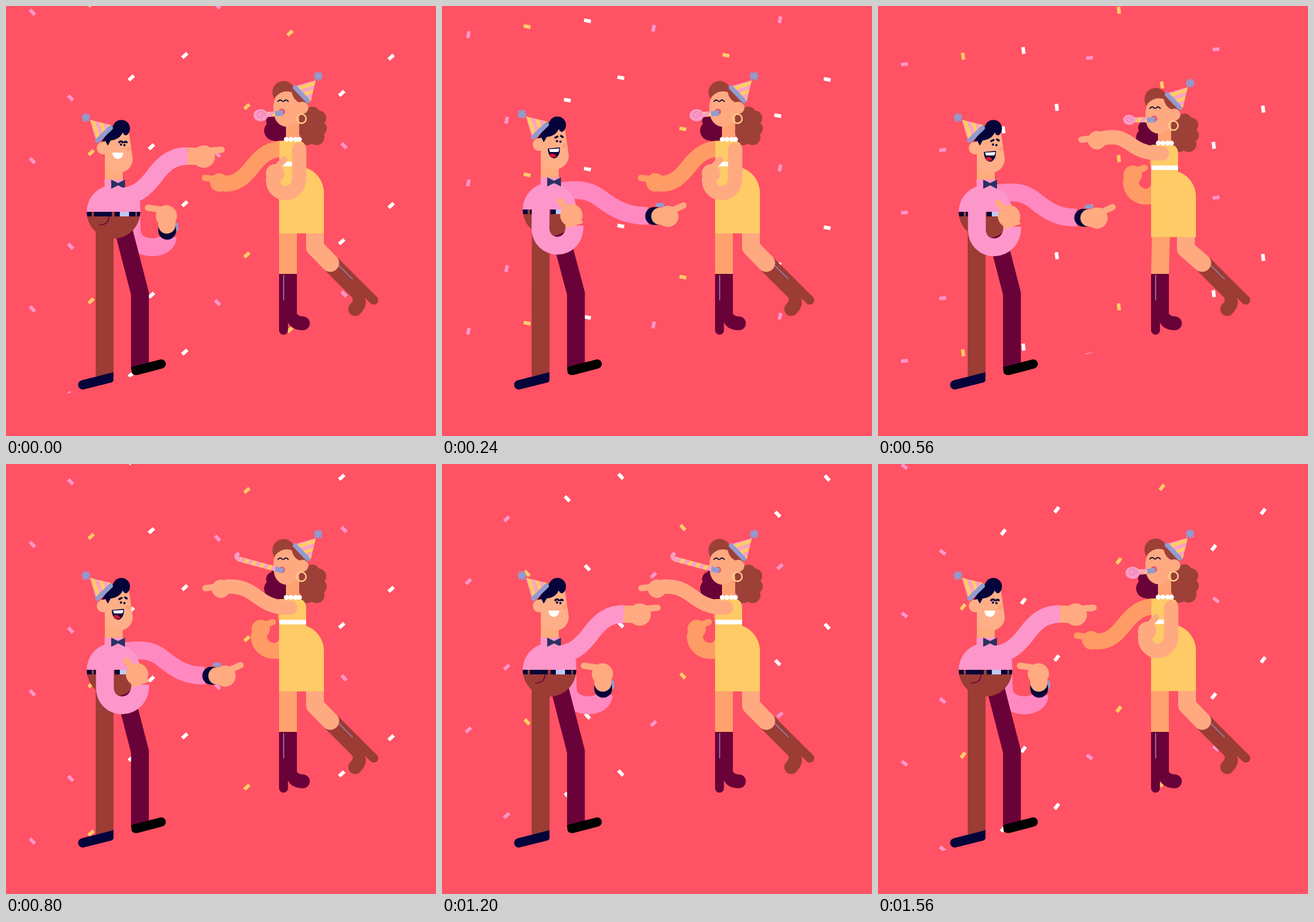
Write an HTML page that moves like this. It is 748 px wide and 748 px high and loops after 1600 ms.

```html
<!DOCTYPE html>
<html lang="en">
<head>
<meta charset="utf-8">
<title>Party</title>
<style>
  html, body { margin: 0; width: 100%; height: 100%; overflow: hidden; background: #ff5264; }
  svg { display: block; width: 100vw; height: 100vh; }
  .line { fill: none; }
  .pom { stroke: #929bd0; stroke-width: 3.4; stroke-linecap: round; }
</style>
</head>
<body>
<svg viewBox="0 0 748 748">
  <defs>
    <clipPath id="floor"><path d="M0 0H748V503L0 703Z"/></clipPath>
    <clipPath id="belly"><circle cx="187" cy="358" r="46.5"/></clipPath>
    <linearGradient id="stripes" gradientUnits="userSpaceOnUse" x1="0" y1="0" x2="12" y2="-4" spreadMethod="repeat">
      <stop offset=".5" stop-color="#fca2c4"/><stop offset=".5" stop-color="#ffcc66"/>
    </linearGradient>
    <linearGradient id="bands" gradientUnits="userSpaceOnUse" x1="0" y1="0" x2="10" y2="8" spreadMethod="repeat">
      <stop offset=".5" stop-color="#fb9cc8"/><stop offset=".5" stop-color="#fecb66"/>
    </linearGradient>
    <g id="hat">
      <path d="M7 4L17 38L44 13Z" fill="url(#stripes)"/>
      <path d="M20 40L43 18" stroke="#929bd0" stroke-width="8" stroke-linecap="round"/>
      <path class="pom" d="M-6.500 0H6.500M0-6.500V6.500M-4.800-4.800L4.800 4.800M-4.800 4.800L4.800-4.800"/>
    </g>
    <g id="boot">
      <path d="M-15.5 0H15.5V69Q18 74 26 74A12 12 0 0 1 26 98C12 98 3 92 0 84V98A7.7 7.7 0 0 1-15.5 98Z"/>
      <path d="M-7.5 2V46" stroke="#8f86bd" stroke-width="1.6"/>
    </g>
  </defs>
  <rect width="748" height="748" fill="#ff5264"/>
  <g id="confetti" clip-path="url(#floor)"></g>

  <g id="man">
    <g id="manFar"></g>
    <path id="legFar" class="line" stroke="#690238" stroke-width="31"/>
    <path id="legNear" class="line" stroke="#9b3c35" stroke-width="31"/>
    <path d="M218 628L268 615A8 8 0 0 1 272 630.5L228 642Q218 643 218 634Z"/>
    <path d="M187 637L132 651A8 8 0 0 0 135 667L183 655Q187 654 187 650Z" fill="#04043a"/>
    <g id="manBody">
      <path d="M172 265H203V306H172Z" fill="#ffac7c"/>
      <g clip-path="url(#belly)">
        <path d="M140 310H235V359H140Z" fill="#fd96cb"/>
        <path d="M140 358H235V406H140Z" fill="#9b3c35"/>
        <path d="M140 358H235V366H140Z" fill="#05053a"/>
        <path d="M149 358H153V366H149ZM184 358H189V366H184ZM225 358H228V366H225Z" fill="#9b3c35"/>
        <path d="M198 358H214V366H198Z" fill="#c1c8f3"/>
        <path class="line" d="M179 366Q179 381 162 381" stroke="#690238" stroke-width="1.6"/>
      </g>
      <path d="M171.5 302H206V320H171.5Z" fill="#fd96cb"/>
      <path d="M183 302L195 308L207 302V318L195 312L183 318Z" fill="#2a3163"/>
    </g>
    <g id="manHead">
      <path d="M172 230L190 217L214 221L220 262A23.5 23.5 0 0 1 196 290Q180 290 172 277Z" fill="#ffaf87"/>
      <circle cx="169" cy="247" r="11" fill="#ffaf87"/>
      <circle cx="213" cy="249" r="4" fill="#ffa176"/>
      <path d="M166 236L187 207A15 15 0 1 1 212 223Q207 228 203 220Q198 232 182 234L177 243L173 235Z" fill="#04043a"/>
      <use href="#hat" x="139" y="194"/>
      <g id="smile">
        <path d="M185 255H204A9.5 11 0 0 1 185 255Z" fill="#fff"/>
        <path class="line" d="M197 237Q200 234 203 237M206 237Q208 235 210 237" stroke="#04043a" stroke-width="3.5" stroke-linecap="round"/>
      </g>
      <g id="laugh">
        <path d="M184 254L205 252A10.5 16 0 0 1 195 271Q185 270 184 254Z" fill="#04043a"/>
        <path d="M186 255L204 254Q204 258 202 260L188 260Z" fill="#fff"/>
        <path d="M187 264Q196 260 199 268Q190 273 187 264Z" fill="#d9132f"/>
        <path class="line" d="M197 235L201 233M207 232L210 234" stroke="#04043a" stroke-width="3.5" stroke-linecap="round"/>
      </g>
      <path d="M200 241h.01M206 242h.01" stroke="#04043a" stroke-width="4" stroke-linecap="round"/>
    </g>
    <g id="manNear"></g>
  </g>

  <g id="woman">
    <g id="hair">
      <g fill="#690238">
        <path d="M462 185H488V235H466Z"/>
        <circle cx="466" cy="217" r="17"/><circle cx="465" cy="200" r="12.5"/>
      </g>
      <g fill="#9d4038">
        <circle cx="529" cy="207" r="25"/><circle cx="533" cy="188" r="13"/>
        <circle cx="544" cy="195" r="13"/><circle cx="546" cy="213" r="12"/>
        <circle cx="540" cy="228" r="14"/><circle cx="524" cy="230" r="12"/>
      </g>
    </g>
    <g id="womanFar"></g>
    <path id="legBack" class="line" stroke="#ffa26d" stroke-width="31"/>
    <use href="#boot" x="490.5" y="466" fill="#690238"/>
    <use href="#boot" transform="translate(565 448) rotate(-45) scale(-1 1)" fill="#9b3c35"/>
    <path id="legLift" class="line" stroke="#ffa981" stroke-width="31" stroke-linecap="round" stroke-linejoin="round"/>
    <g id="womanBody">
      <path d="M487 195H510V240H487Z" fill="#ffa272"/>
      <path d="M475.5 235H512Q522 238 522 250V285H475.5Z" fill="#fecb66"/>
      <path d="M475.5 271H522V279H475.5Z" fill="#fff"/>
      <path d="M475 279H507A46 46 0 0 1 553 325V395.5H475Z" fill="#fecb66"/>
      <path d="M487.5 232h.01m8 0h.01m8 0h.01m7 0h.01" stroke="#fff" stroke-width="8.5" stroke-linecap="round"/>
    </g>
    <g id="womanHead">
      <circle cx="483" cy="150" r="19.5" fill="#9d4038"/>
      <path d="M488 133L505 143L526 169L507 178L490 155Z" fill="#9d4038"/>
      <path d="M469 158Q481 145 497 150Q500 164 511 168V186A22 24 0 0 1 466 185Q463 172 469 158Z" fill="#ffa981"/>
      <circle cx="515.5" cy="177" r="10.5" fill="#ffa981"/>
      <circle cx="514" cy="196" r="8" class="line" stroke="#ffd08a" stroke-width="2.5"/>
      <use href="#hat" transform="translate(543 122) rotate(90)"/>
      <path class="line" d="M473 166Q477 161 481 166M483 166Q487 161 491 166" stroke="#14082e" stroke-width="2" stroke-linecap="round"/>
      <circle cx="480" cy="184" r="5.5" fill="#e75470"/>
      <g class="line" stroke-width="9">
        <path id="tube" stroke="url(#bands)"/>
        <path id="tip" stroke="#929bd0"/>
        <path id="hook" stroke="#fb9cc8" stroke-width="7" stroke-linecap="round"/>
      </g>
      <g id="roll">
        <ellipse rx="12.5" ry="10.5" fill="#fb9cc8"/>
        <path class="line" d="M0 0Q4-4 4 1Q2 6-4 3Q-9-3-1-6Q8-7 8 2" stroke="#ee7db4" stroke-width="1.5"/>
      </g>
    </g>
    <g id="womanNear"></g>
  </g>
</svg>
<script>
const LOOP = 1600, STEP = 40, TILE = 258;
const $ = id => document.getElementById(id);
const set = (el, attrs) => { for (const k in attrs) el.setAttribute(k, attrs[k]); };
const make = (parent, tag, attrs) => {
  const el = document.createElementNS('http://www.w3.org/2000/svg', tag);
  set(el, attrs);
  return parent.appendChild(el);
};
const mix = (a, b, p) => a + (b - a) * p;
const ease = x => { x = Math.max(0, Math.min(1, x)); return x * x * (3 - 2 * x); };
const shift = (id, y) => set($(id), { transform: `translate(0 ${y})` });

const columns = [
  [46, 11, 'p'], [112.5, 160, 'p'], [148, 255, 'y'], [218, 125, 'w'], [253, 245, 'w'], [311, 86, 'w'],
  [368, 0, 'p'], [419, 175, 'y'], [494, 47, 'y'], [588, 243, 'p'], [584, 152, 'w'], [670, 89, 'w']
];
const tints = { p: '#fd95cb', y: '#fecb66', w: '#fff' };
const bits = columns.flatMap(([x, y, c]) => [-1, 0, 1, 2].map(n => ({
  x, y: y + n * TILE, turn: c === 'p' ? 47 : -43,
  el: make($('confetti'), 'rect', { x: -6, y: -3.1, width: 12, height: 6.2, fill: tints[c] })
})));

// Seven points of a two-part curve, then fist, finger base, fingertip and watch.
const pose = s => s.split(' ').map(p => p.split(',').map(Number));

function arm(id, o) {
  const g = $(id);
  const stroke = (color, width, cap = 'butt') =>
    make(g, 'path', { class: 'line', stroke: color, 'stroke-width': width, 'stroke-linecap': cap });
  const watch = o.watch && stroke('#929bd0', 7, 'round');
  const sleeve = stroke(o.color, o.width, o.color === o.skin ? 'round' : 'butt');
  const cuff = o.watch && stroke('#05053a', o.width, 'round');
  const link = stroke(o.skin, o.width - 1, o.watch ? 'round' : 'butt');
  const fist = make(g, 'circle', { r: o.fist, fill: o.skin });
  const finger = stroke(o.skin, 11, 'round');
  const a = pose(o.a), b = pose(o.b);
  return ({ b: p, over, toB }, dip) => {
    const [ox, oy] = toB ? o.overB : o.overA;
    const q = a.map(([x, y], i) => {
      const w = Math.min(i / 6, 1) ** 2 * over;
      return [mix(x, b[i][0], p) + ox * w, mix(y, b[i][1], p) + oy * w];
    });
    const [end, hand, base, tip, w] = q.slice(6);
    const dx = hand[0] - end[0], dy = hand[1] - end[1], len = Math.hypot(dx, dy) || 1;
    const ux = dx / len, uy = dy / len;
    const along = d => `${end[0] + ux * d} ${end[1] + uy * d}`;
    set(g, { transform: `translate(0 ${dip})` });
    set(sleeve, { d: `M${q[0]}C${q.slice(1, 4).join(' ')}C${q.slice(4, 7).join(' ')}` });
    set(link, { d: `M${along(o.watch ? 21 : 0)}L${hand}` });
    set(fist, { cx: hand[0], cy: hand[1] });
    set(finger, { d: `M${base}L${tip}` });
    if (watch) {
      set(watch, { d: `M${w[0] - ux * 4} ${w[1] - uy * 4}l${ux * 8} ${uy * 8}` });
      set(cuff, { d: `M${along(11)}L${along(15)}` });
    }
  };
}

const still = [0, 0];
const manArms = [
  arm('manNear', {
    color: '#fd96cb', skin: '#ffaa80', width: 31, fist: 19.5, overA: [-8, 8], overB: [-3, 2],
    a: '195,332 223,332 240,320 258,296 276,271 292,261 316,261 344,262 352,252 375,250',
    b: '172,330 172,350 172,370 172,388 172,431 233.5,431 233.5,384 228,366 218,353 209,342'
  }),
  arm('manFar', {
    color: '#ff88c1', skin: '#ffaa80', width: 31, fist: 18.5, watch: true, overA: [29, 0], overB: [12, 1],
    a: '218,340 218,365 218,378 219,392 220,427 281,427 281,402 279,365 268,354 247,351 296,384',
    b: '205,326 228,324 250,320 272,338 295,357 315,369 346,368 381,369 390,358 408,350 367,349'
  })
];
const womanArms = [
  arm('womanNear', {
    color: '#ffa981', skin: '#ffa981', width: 25, fist: 16, overA: still, overB: [7, 10],
    a: '510,250 510,270 510,285 510,298 510,334 464.5,334 464.5,302 468,291 473,279 484,267',
    b: '494,250 465,250 450,241 436,230 418,217 408,213 386,213 374,217 364,214 347,216'
  }),
  arm('womanFar', {
    color: '#ff9b65', skin: '#ff9b65', width: 28, fist: 16, overA: still, overB: still,
    a: '485,248 460,248 446,258 430,278 414,299 401,309 382,309 371,307 362,301 346,299',
    b: '487,265 492,285 494,310 480,321 466,331 440,322 440,300 443,287 450,280 464,275'
  })
];

// Every half loop a figure snaps to its other pose, ducks, rebounds and settles.
function act(t, start) {
  const s = (t - start + LOOP) % LOOP, q = s % 800, toB = s < 800;
  const go = x => toB ? x : 1 - x;
  const k = ease(q / 160);
  return {
    toB, b: go(k),
    over: k * (1 - ease((q - 240) / 160)),
    dip: 1.39 * Math.sin(Math.PI * q / 215) * (1 - ease((q - 240) / 140)),
    blow: go(ease((q - 120) / 160)),
    loud: go(q >= 80 ? 1 : 0)
  };
}

function drawMan(t) {
  const m = act(t, 0), d = m.dip * 8;
  manArms.forEach(f => f(m, d));
  shift('manBody', d);
  shift('manHead', m.dip * 12);
  set($('legNear'), { d: `M${171.5 - d * 0.1} ${385 + d}L${171.5 - Math.max(d, 0) * 0.5} 500L171.5 644` });
  set($('legFar'), { d: `M${204.5 + d * 0.5} ${390 + d}L${233 + Math.max(d, 0) * 0.25} 500L233 632` });
  $('laugh').style.display = m.loud ? '' : 'none';
  $('smile').style.display = m.loud ? 'none' : '';
}

function drawWoman(t) {
  const w = act(t, 400), d = w.dip * 6.5;
  womanArms.forEach(f => f(w, d));
  shift('womanBody', d);
  shift('womanHead', w.dip * 12);
  shift('hair', w.dip * 12);
  set($('legBack'), { d: `M${490.5 + d * 0.3} ${385 + d}L490.5 467` });
  set($('legLift'), { d: `M${537.5 - d * 0.3} ${385 + d}V${420 + d * 0.4}L564 447` });
  const u = w.blow, x = mix(443, 404, u), y = mix(190, 165, u);
  const dx = x - 482, dy = y - 186, len = Math.hypot(dx, dy);
  set($('tube'), { d: `M482 186L${x} ${y}` });
  set($('tip'), { d: `M482 186l${dx / len * 14} ${dy / len * 14}` });
  set($('hook'), { d: `M${x} ${y}q${-6 * u} ${-4 * u} ${-1 * u} ${-8 * u}` });
  set($('roll'), { transform: `translate(${x} ${y}) scale(${1 - u})` });
}

function draw(now) {
  const t = Math.floor((now % LOOP) / STEP) * STEP, p = t / LOOP;
  for (const b of bits)
    set(b.el, { transform: `translate(${b.x} ${b.y + TILE * p}) rotate(${b.turn + 360 * p})` });
  drawMan(t);
  drawWoman(t);
}

let first;
function tick(now) {
  first ??= now;
  draw(now - first);
  requestAnimationFrame(tick);
}
draw(0);
requestAnimationFrame(tick);
</script>
</body>
</html>
```
